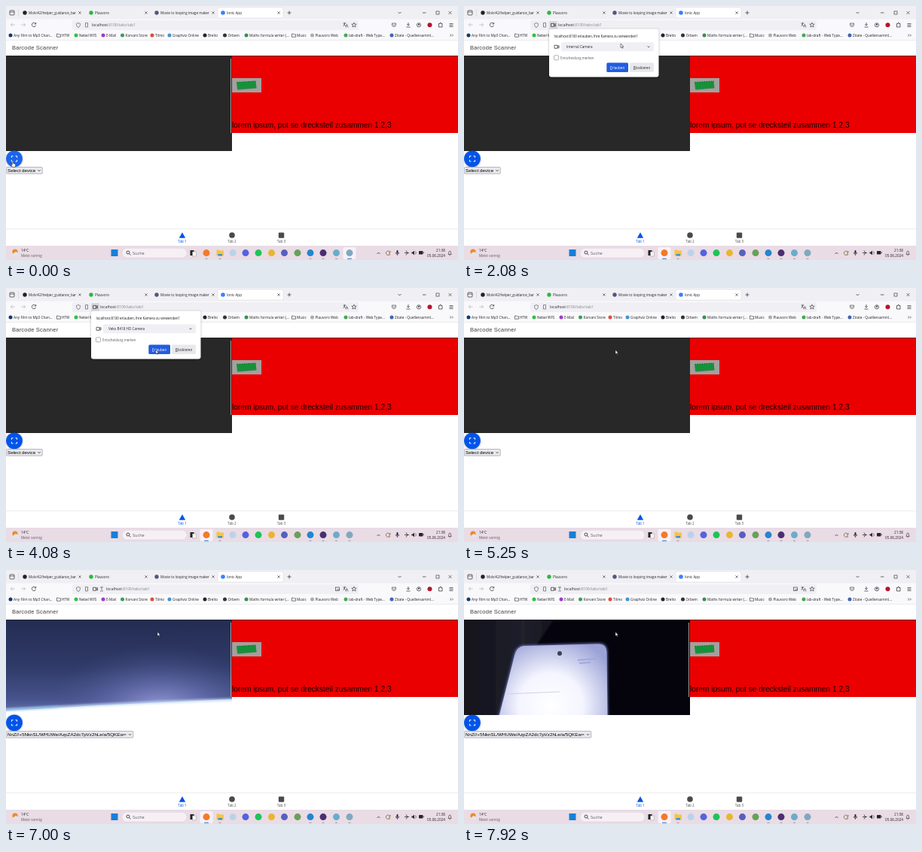
An HTML page for the animation above (8 s loop, 600 by 338 pixels).

```html
<!DOCTYPE html>
<html lang="de">
<head>
<meta charset="utf-8">
<title>Barcode Scanner</title>
<style>
html, body { margin: 0; width: 100%; height: 100%; overflow: hidden; background: #fff; }
svg { display: block; width: 100vw; height: 100vh; }
text { font-family: "Open Sans", "Noto Sans", sans-serif; white-space: pre; }
.arial { font-family: "Liberation Sans", Arial, sans-serif; }
</style>
</head>
<body>
<svg id="stage" viewBox="0 0 600 338" xmlns="http://www.w3.org/2000/svg"></svg>
<script>
const INK = '#25252b', GREY = '#5b5b66', FAINT = '#b0b0b8', BLUE = '#0054e9';

const rect = (x, y, w, h, fill, extra = '') =>
  `<rect x="${x}" y="${y}" width="${w}" height="${h}" fill="${fill}" ${extra}/>`;
const dot = (x, y, r, fill, extra = '') =>
  `<circle cx="${x}" cy="${y}" r="${r}" fill="${fill}" ${extra}/>`;
const line = (d, color = INK, width = .7, extra = '') =>
  `<path d="${d}" fill="none" stroke="${color}" stroke-width="${width}" ${extra}/>`;
const shape = (d, fill, extra = '') => `<path d="${d}" fill="${fill}" ${extra}/>`;
const text = (x, y, str, size = 4.6, fill = INK, extra = '') =>
  `<text x="${x}" y="${y}" font-size="${size}" fill="${fill}" ${extra}>${str}</text>`;
const group = (id, body, extra = '') => `<g id="${id}" ${extra}>${body}</g>`;
const cross = (x, y, r = 1.6) => line(`M${x - r} ${y - r}l${2 * r} ${2 * r}m0 ${-2 * r}l${-2 * r} ${2 * r}`, INK, .6);
const folder = (x, y) => line(`M${x - 2.5} ${y - 2}h2l.8 .8h2.2v3.4h-5z`, INK, .6);
const chevron = (x, y, r = 1.5, color = INK) => line(`M${x - r} ${y - r / 2}l${r} ${r}l${r} ${-r}`, color, .7);
const camera = (x, y, color = INK) =>
  line(`M${x - 3} ${y - 2}h4v4h-4zM${x + 1} ${y - .5}l2 -1.3v3.6l-2 -1.3`, color, .7);

function tabStrip() {
  const tab = (x, end, color, label) =>
    dot(x, 9, 2.7, color) + text(x + 5, 11, label) + rect(end - 5, 3, 11, 13, '#f0f0f4') + cross(end, 9);
  return rect(0, 0, 600, 18, '#f0f0f4') +
    rect(5, 6, 6, 6, 'none', `stroke="${INK}" stroke-width=".7" rx="1"`) + line('M5 8h6', INK, .6) +
    line('M16.5 4v10', '#cfcfd8', .6) +
    tab(25, 98, '#202328', 'Molvi42/helper_guidance_bar') +
    tab(113, 186, '#2bb741', 'Plauvoro') +
    tab(200, 275, '#50577e', 'Movie to looping image maker') +
    rect(281, 2, 87, 14, '#fff', 'rx="2" stroke="#d5d5dd" stroke-width=".5"') +
    dot(288, 9, 2.8, '#3880ff') + text(293, 11, 'Ionic App') + cross(362, 9) +
    line('M373.5 9h5M376 6.5v5') + chevron(522.5, 9, 2) +
    line('M553 9h4.500') + rect(571, 7, 4, 4, 'none', `stroke="${INK}" stroke-width=".6"`) + cross(589.5, 9, 2);
}

function toolbar() {
  const arrow = (x, dir) => line(`M${x - 2.7 * dir} 25h${5.4 * dir}m${-2.3 * dir} -2.3l${2.3 * dir} 2.3l${-2.3 * dir} 2.3`, FAINT);
  const url = (id, x) => group(id,
    text(x, 27.2, 'localhost<tspan fill="#82828c">:8100/tabs/tab1</tspan>', 5));
  return rect(0, 17.5, 600, 28, '#f9f9fb') + arrow(9, -1) + arrow(23, 1) +
    line('M39.3 23.5a2.7 2.7 0 1 0 .3 2.3M39.7 22v2h-2') +
    rect(88, 19, 380, 13, '#f0f0f4', 'rx="2"') +
    line('M96 22.5l2.5 1c0 3 -1 4.5 -2.5 5.2c-1.5 -.7 -2.5 -2.2 -2.5 -5.2z', GREY) +
    line('M105.5 22.5h3v5.5h-3z', GREY) +
    url('urlIdle', 114) +
    group('urlAsk', rect(113, 20, 11, 11, '#d8d8df', 'rx="1.5"') + camera(118.5, 25.3)) +
    url('urlAskText', 125) +
    group('urlLive', camera(118.5, 25.3) + line('M125 23h4m-2 -1v5m-2 1h4', GREY)) +
    url('urlLiveText', 133) +
    group('capture', rect(437.5, 23, 5, 4.5, 'none', `stroke="${INK}" stroke-width=".6"`) + line('M439 26h4', INK, .6)) +
    line('M447.5 23h4m-2 -1v1c0 2 -1 3 -2 4m1 -3l2.5 3M451 28.5l1.5 -4l1.5 4', INK, .6) +
    line('M462 22l.9 2.1l2.3 .1l-1.8 1.5l.7 2.3l-2.1 -1.3l-2.1 1.3l.7 -2.3l-1.8 -1.5l2.3 -.1z', INK, .6) +
    line('M512.5 23h5v2a2.5 2.5 0 0 1 -5 0zM513.7 24.5l1.3 1.2l1.3 -1.2', INK, .6) +
    line('M534 22v4m-1.7 -1.7l1.7 1.7l1.7 -1.7M531.5 28h5') +
    dot(548, 25.3, 2.6, 'none', `stroke="${INK}" stroke-width=".7"`) + dot(548, 24.8, 1, INK) +
    dot(562.5, 25.3, 3, '#b3152c') +
    line('M574.5 23.5h1.5v-1h1.5v1h1.5v4.5h-4.5z') +
    line('M588.5 23.5h5m-5 2h5m-5 2h5');
}

function bookmarks() {
  const links = [
    [6, '#123a68', 'Any Film to Mp3 Chan...'], [70, 0, 'HTW'], [93, '#35bd46', 'Nebel WFS'],
    [129, '#9b3bc9', 'E-Mail'], [154.5, '#3f9a5c', 'Korvani Store'], [194, '#e24a3c', 'Tilmo'],
    [217, '#4b91c9', 'Graphviz Online'], [264, '#22252a', 'Brelto'], [290.5, '#333', 'Orbem'],
    [319, '#3c8c57', 'Maths formula writer (...'], [382, 0, 'Music'], [406.5, '#a7b0ab', 'Plauvoro Web'],
    [451, '#4aa657', 'lab-draft - Web Type...'], [512, '#4564ad', 'Zitate - Quellensamml...']
  ];
  return links.map(([x, color, label]) =>
    (color ? dot(x, 39, 2.5, color) : folder(x, 39)) + text(x + 4, 40.7, label, 4.7)).join('') +
    line('M589.5 37.5l1.5 1.5l-1.5 1.5m2.5 -3l1.5 1.5l-1.5 1.5', INK, .6);
}

function video() {
  const surface = rect(-60, 60, 420, 140, 'url(#sky)') + rect(-60, 60, 420, 140, 'url(#glow)') +
    shape('M-60 190L0 187Q150 178 300 172L360 170V330H-60z', '#fff') +
    line('M-20 187.500Q150 177 310 172', '#c4dcfa', 3, 'filter="url(#soft)"') +
    line('M-20 187L70 182', '#79c4ef', 1.5, 'filter="url(#soft)"');
  const phone = shape('M-90 40H136L95 102L45 240H-90z', 'url(#desk)', 'filter="url(#soft)"') +
    shape('M34 240L66 113Q69 101 78 100L178 97Q190 97 190.500 108L192 240z', '#5f68a8', 'filter="url(#soft)"') +
    shape('M35 240L67 114Q70 102 79 101L178 98.500Q189 98 189.500 109L191 240z', 'url(#screen)', 'filter="url(#fine)"') +
    dot(127, 111, 3, '#3f4055', 'filter="url(#fine)"') +
    line('M151 120l24 -2M153 124l15 -1', '#a0a8dc', 2, 'filter="url(#fine)"') +
    line('M57 165l70 -3', '#cfd0e9', 1, 'filter="url(#fine)"');
  return group('live', rect(0, 66, 300, 127, '#05040c') + group('phone', phone) + group('surface', surface),
    'clip-path="url(#frame)"');
}

function page() {
  const scan = [[-1, -1], [1, -1], [1, 1], [-1, 1]].map(([sx, sy]) =>
    line(`M${11 + sx * 1.5} ${203.3 + sy * 3.6}h${sx * 2.1}v${-sy * 2.1}`, '#fff', 1)).join('');
  const select = (id, w, label) => group(id,
    rect(.3, 214.5, w, 8.7, '#e9e9ed', 'stroke="#8f8f9d" stroke-width=".6" rx="1"') +
    text(2, 221, label, 6.26, '#000', 'class="arial"') + chevron(w - 4, 219, 1.5, '#000'));
  const navTab = (x, label, color, icon) => icon + text(x, 315, label, 4.6, color, 'text-anchor="middle"');
  return rect(0, 45.5, 600, 274, '#fff') + line('M0 45.5h600', '#d9d9de', .5) +
    text(8, 58.3, 'Barcode Scanner', 7.6, '#3c3c3c', 'class="arial" letter-spacing=".18"') +
    rect(300, 66, 300, 103, '#ea0000') + group('blank', rect(0, 66, 300, 127, '#282828')) + video() +
    rect(0, 66, 600, 1, '#25252a', 'opacity=".7"') +
    group('scrollbar', rect(298, 70, 1, 99, '#a0a0a0')) +
    rect(300, 96, 39, 19, '#a3a09e') +
    shape('M307 103l24 -2.5l1.5 9l-25 2.3z', '#72756f') + shape('M306 101.5l25.5 -1.5l1 9l-25.5 1.7z', '#14923a') +
    line('M306.5 101.5l25 -1.5', '#0b6928', 1, 'stroke-dasharray="1.5 1.5"') +
    text(300, 161.6, 'lorem ipsum, put se drecksteil zusammen 1,2,3', 10.15, '#180000', 'class="arial"') +
    dot(11, 204, 11, '#000', 'opacity=".25" filter="url(#soft)"') +
    dot(11, 203.3, 10.9, BLUE, 'id="scan"') + scan +
    select('deviceNone', 48, 'Select device') +
    select('deviceChosen', 168.5, 'NnZ//+5NknSL/WHUWe/AzpZA2dc7pVz2hLe/a/5QKEw=') +
    line('M0 296.7h600', '#dedee2', .6) +
    navTab(234, 'Tab 1', BLUE, shape('M234 301.3l4.2 7.4h-8.4z', BLUE)) +
    navTab(300, 'Tab 2', '#4a4a4a', dot(300, 305, 3.8, '#4a4a4a')) +
    navTab(365.5, 'Tab 3', '#4a4a4a', rect(361.8, 301.4, 7.4, 7.4, '#4a4a4a', 'rx="1"'));
}

function taskbar() {
  const apps = [
    [266, '#f27a2b'], [301, '#b9d3ea'], [318, '#5462df'], [335, '#1fc35a'], [352.5, '#e8b62f'],
    [369.5, '#5660bd'], [387, '#68a05a'], [404, '#2485d0'], [421, '#4c2d72'], [438.5, '#6aaccb'], [456, '#7fa8bf']
  ];
  const active = (id, x) => group(id, rect(x - 8.5, 321, 17, 16, '#f7f1f6', 'rx="2"') +
    rect(x - 3, 335.7, 6, 1, '#2b72c8', 'rx=".5"'));
  const running = [266, 284, 404, 421, 438.5, 456].map(x => rect(x - 1.5, 335.8, 3, .8, '#8d858d')).join('');
  return rect(0, 319, 600, 19, '#e9dce5') +
    dot(12, 327, 3.6, '#f08a24') + shape('M10 332a2 2 0 0 1 1 -3.6a2.6 2.6 0 0 1 4.6 .6a1.6 1.6 0 0 1 .4 3z', '#dfe7f0') +
    text(20, 327, '14°C', 4.7) + text(20, 333.6, 'Meist sonnig', 4.7, GREY) +
    rect(139.5, 324, 9, 9, '#1680d6') +
    rect(154, 322.3, 86, 12.8, '#f6f0f5', 'rx="6.4" stroke="#d6cad3" stroke-width=".4"') +
    dot(162, 328, 2, 'none', `stroke="${INK}" stroke-width=".8"`) + line('M163.5 329.5l2 2', INK, .8) +
    text(168, 331, 'Suche', 5.6, GREY) +
    rect(244.5, 325, 5, 7, '#222') + rect(247.5, 327, 5, 6, '#f5f5f5', 'stroke="#888" stroke-width=".4"') +
    running + active('activeSnip', 456) + active('activeBrowser', 266) +
    shape('M279.5 324.5h3.5l1 1h5v7h-9.5z', '#f5c541') + rect(281.5, 330, 5.5, 2.5, '#3c91d6') +
    apps.map(([x, color]) => dot(x, 328.6, 4.5, color)).join('') +
    line('M492.5 330l2 -2l2 2') +
    line('M509.5 327.5a2.7 2.7 0 1 0 .2 2M510 326v2h-2', '#555', .7) + dot(509, 330.5, 1.2, '#ee8a24') +
    rect(518.5, 325, 2, 4.5, INK, 'rx="1"') + line('M517.3 328a2.2 2.2 0 0 0 4.4 0M519.5 330.3v1.7') +
    line('M529 328.5h6m-4 -3l2 3l-2 3', INK, .8) +
    shape('M538.5 327.5h1.5l2 -2v6l-2 -2h-1.5z', INK) + line('M543.5 326.5q1.5 2 0 4', INK, .6) +
    rect(548, 326, 5.5, 4.5, INK, 'rx=".8"') + rect(554, 327.5, .7, 1.5, INK) +
    text(583, 327, '21:38', 4.7, INK, 'text-anchor="end"') +
    text(583, 333.6, '05.06.2024', 4.7, INK, 'text-anchor="end"') +
    line('M587 330.5q1 -1 .8 -3a1.3 1.3 0 0 1 2.7 0q-.2 2 .8 3zM588.5 331.7h1.5', INK, .6);
}

function permission() {
  const first = 'Internal Camera', second = 'Veko B418 HD Camera';
  const key = label => `<tspan text-decoration="underline">${label[0]}</tspan>${label.slice(1)}`;
  const button = (x, w, fill, ink, label) => rect(x, 75.5, w, 12.5, fill, 'rx="1.5"') +
    text(x + w / 2, 83.5, key(label), 4.6, ink, 'text-anchor="middle"');
  return group('popup',
    rect(113, 31, 145.5, 64.5, '#000', 'rx="3" opacity=".3" filter="url(#soft)"') +
    rect(113, 30.5, 145.5, 64, '#fff', 'rx="3"') +
    text(119.5, 42, 'localhost:8100 erlauben, Ihre Kamera zu verwenden?', 4.5, '#15141a', 'font-weight="500"') +
    camera(123, 54.3) + rect(129, 48.3, 123, 12, '#f0f0f4', 'id="picker" rx="1.5"') +
    group('pickedFirst', text(136, 56, first)) + group('pickedSecond', text(136, 56, second)) + chevron(245, 54.3) +
    rect(119.5, 65.8, 6, 6, '#fff', 'rx="1" stroke="#8f8f9d" stroke-width=".7"') +
    text(128, 70.5, 'Entscheidung merken', 4.4, GREY) +
    button(189.3, 28.7, '#215de0', '#fff', 'Erlauben') + button(220, 32, '#e9e9ed', INK, 'Blockieren') +
    group('menu', rect(128.5, 61.3, 123.5, 25.7, '#fff', 'rx="1" stroke="#c4c4cc" stroke-width=".6"') +
      rect(131, 63, 119, 11, '#dcdce6', 'id="option"') + text(135, 70, first) + text(135, 81.7, second)));
}

const gradient = (kind, id, attrs, stops) => `<${kind}Gradient id="${id}" ${attrs}>` +
  stops.map(([at, color, alpha = 1]) => `<stop offset="${at}" stop-color="${color}" stop-opacity="${alpha}"/>`).join('') +
  `</${kind}Gradient>`;
const blur = (id, amount) => `<filter id="${id}" x="-50%" y="-50%" width="200%" height="200%"><feGaussianBlur stdDeviation="${amount}"/></filter>`;
const defs = `<defs>${blur('soft', 1.5)}${blur('fine', .6)}
  <clipPath id="frame"><rect x="0" y="66" width="300" height="127"/></clipPath>` +
  gradient('linear', 'sky', 'x1="0" y1="0" x2="0" y2="1"', [[0, '#222b50'], [.5, '#303b69'], [.8, '#47538c'], [.9, '#5f6ba4']]) +
  gradient('radial', 'glow', 'gradientUnits="userSpaceOnUse" cx="205" cy="185" r="1" gradientTransform="translate(205 185) scale(150 85) translate(-205 -185)"',
    [[0, '#a9aae6', .85], [.5, '#7078bb', .45], [1, '#47538c', 0]]) +
  gradient('linear', 'desk', 'x1="0" y1="0" x2="1" y2="0"', [[.4, '#12121c'], [.75, '#20202c'], [1, '#101019']]) +
  gradient('radial', 'screen', 'gradientUnits="userSpaceOnUse" cx="115" cy="180" r="95"', [[0, '#ffffff'], [.45, '#f4f5ff'], [1, '#9ba2d6']]) + '</defs>';

const hand = shape('M-.8 -2.5q.8 -1 1.5 0v3l2.5 .7q.8 .4 .5 1.7l-.7 2.6h-3.3l-2 -3q.3 -1 1.5 0z', '#fff', 'stroke="#111" stroke-width=".5"');
const pointer = shape('M0 -2v5.5l1.3 -1.2l.9 2l.9 -.4l-.9 -1.9h1.7z', '#fff', 'stroke="#111" stroke-width=".5"');

document.getElementById('stage').innerHTML = defs + tabStrip() + toolbar() + bookmarks() + page() + taskbar() +
  permission() + group('cursor', group('hand', hand) + group('pointer', pointer));

const $ = id => document.getElementById(id);
const show = (id, on) => $(id).style.display = on ? '' : 'none';
const ease = p => p * p * (3 - 2 * p);
const progress = (t, from, to) => ease(Math.min(1, Math.max(0, (t - from) / (to - from))));

// Cursor stops: time, x, y
const path = [[0, 9, 209], [1250, 9, 209], [1900, 208, 52], [3000, 208, 52], [3400, 165, 80], [3700, 165, 80], [4150, 201, 84.5], [8000, 201, 84.5]];

function cursorAt(t) {
  const i = path.findIndex(stop => stop[0] > t);
  const [t0, x0, y0] = path[i - 1], [t1, x1, y1] = path[i], p = progress(t, t0, t1);
  return [x0 + (x1 - x0) * p, y0 + (y1 - y0) * p];
}

function draw(t) {
  const asking = t >= 600 && t < 4600, live = t >= 5920, streaming = t >= 6800;
  const menu = t >= 2300 && t < 3600, picked = t >= 3600, hovering = t < 1320;
  const [x, y] = cursorAt(t);

  show('activeSnip', t < 250);
  show('activeBrowser', t >= 250);
  show('urlIdle', !asking && !live);
  show('urlAsk', asking);
  show('urlAskText', asking);
  show('urlLive', live);
  show('urlLiveText', live);
  show('capture', streaming);
  show('popup', asking);
  show('menu', menu);
  show('pickedFirst', !picked);
  show('pickedSecond', picked);
  $('option').setAttribute('y', y > 74 ? 75 : 63);
  $('picker').setAttribute('fill', menu ? '#d6d6dd' : '#f0f0f4');
  $('scan').setAttribute('fill', hovering ? '#1b65eb' : BLUE);
  show('deviceNone', !live);
  show('deviceChosen', live);
  show('scrollbar', t < 900 || (t >= 2200 && t < 4600) || streaming);

  show('blank', !streaming);
  show('live', streaming);
  const pan = progress(t, 7150, 7600);
  $('surface').setAttribute('transform', `translate(0 ${-20 * pan})`);
  $('surface').setAttribute('opacity', 1 - pan);
  const settle = 1 - progress(t, 7250, 7900);
  $('phone').setAttribute('transform', `translate(${30 * settle} ${45 * settle})`);

  show('hand', hovering);
  show('pointer', !hovering);
  $('cursor').setAttribute('transform', `translate(${x} ${y})`);
}

const start = performance.now();
function tick() {
  draw((performance.now() - start) % 8000);
  requestAnimationFrame(tick);
}
tick();
</script>
</body>
</html>
```
